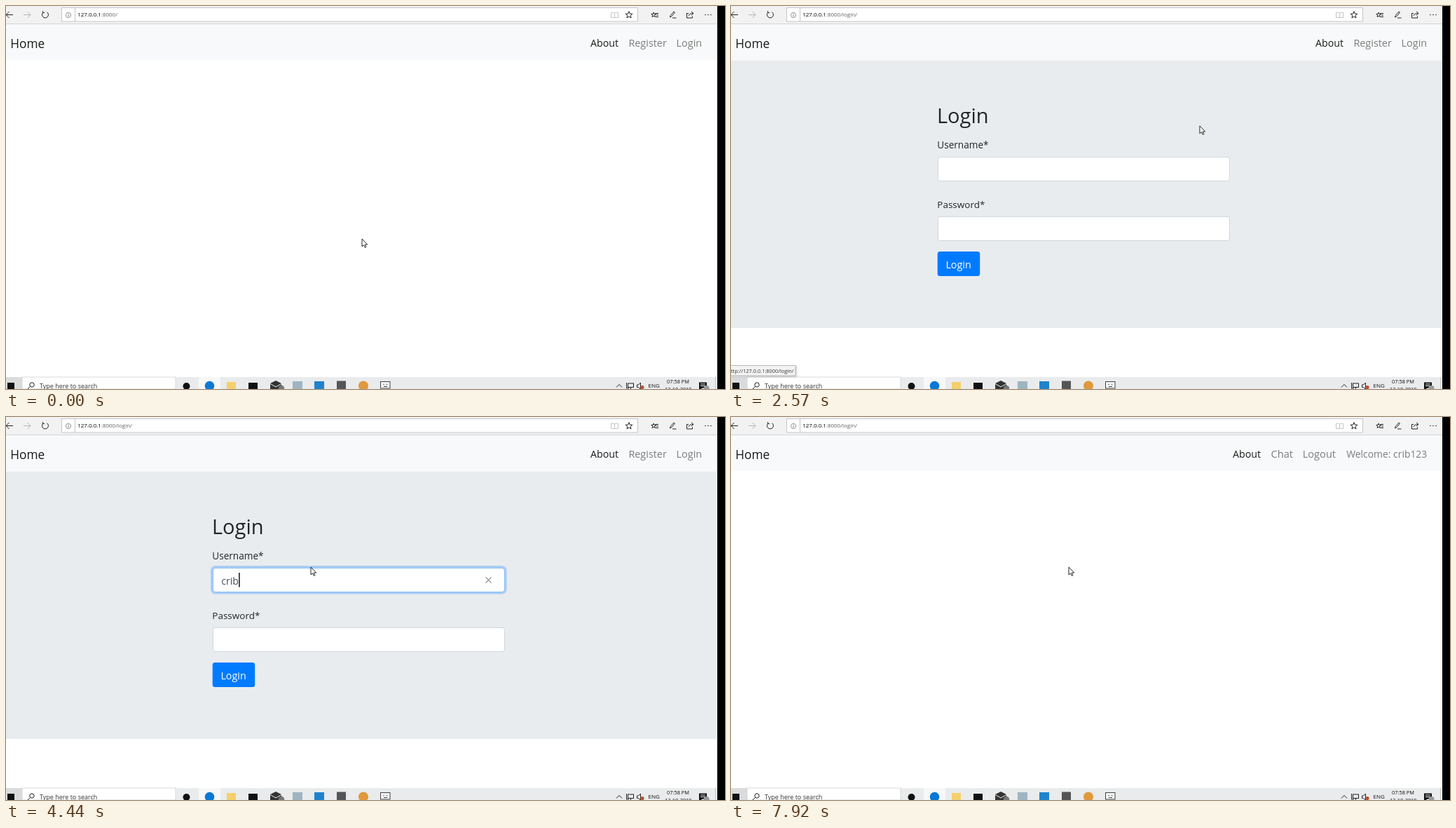
Write an HTML page that moves like this. It is 1026 px wide and 546 px high and loops after 8000 ms.

```html
<!DOCTYPE html>
<html lang="en">
<head>
<meta charset="utf-8">
<title>Login demo</title>
<style>
html, body { margin: 0; width: 100%; height: 100%; overflow: hidden; background: #fff; }
svg { display: block; width: 1026px; height: 546px; }
text { font-family: "Open Sans", "Noto Sans", sans-serif; white-space: pre; }
#dialog > .panel { filter: drop-shadow(0 4px 6px rgba(0, 0, 0, .45)); }
.line { fill: none; stroke-width: 1; }
</style>
</head>
<body>
<svg id="stage" viewBox="0 0 1026 546" xmlns="http://www.w3.org/2000/svg"></svg>
<script>
const LOOP = 8000;
const USER = "crib123";
const USER_KEYS = [3680, 4040, 4240, 4440, 4570, 4760, 4950];
const PASS_KEYS = [6010, 6110, 6310, 6470, 6570, 6760, 6930];
const FOCUS_USER = 3050, FOCUS_PASS = 5700;
const LOGIN_PAGE = 2350, WELCOME_PAGE = 7820;

// time, x, y of the pointer's tip
const POINTER = [
  [0, 508, 332], [300, 508, 332], [630, 532, 321], [800, 532, 321],
  [910, 583, 309], [1210, 583, 309], [1730, 782, 217], [1980, 1004, 60],
  [2020, 1000, 59], [2120, 976, 52], [2250, 976, 52], [2620, 622, 189],
  [2820, 520, 214], [3050, 428, 238], [3300, 428, 238], [3650, 435, 214],
  [7320, 435, 214], [7590, 482, 214], [8000, 482, 214]
];

const text = (x, y, size, str, fill = "#212529", extra = "") =>
  `<text x="${x}" y="${y}" font-size="${size}" fill="${fill}" ${extra}>${str}</text>`;
const rect = (x, y, w, h, fill, extra = "") =>
  `<rect x="${x}" y="${y}" width="${w}" height="${h}" fill="${fill}" ${extra}/>`;
const line = (d, stroke = "#222", extra = "") =>
  `<path class="line" d="${d}" stroke="${stroke}" ${extra}/>`;
const dot = (x, y, r, fill, extra = "") =>
  `<circle cx="${x}" cy="${y}" r="${r}" fill="${fill}" ${extra}/>`;
const group = (id, body) => `<g id="${id}">${body}</g>`;
const cross = (x, y, r, stroke) =>
  line(`M${x - r} ${y - r}l${2 * r} ${2 * r}M${x + r} ${y - r}l${-2 * r} ${2 * r}`, stroke);

function star(cx, cy, r) {
  let d = "";
  for (let i = 0; i < 10; i++) {
    const a = i * Math.PI / 5 - Math.PI / 2, q = i % 2 ? r * 0.42 : r;
    d += (i ? "L" : "M") + (cx + q * Math.cos(a)).toFixed(2) + " " + (cy + q * Math.sin(a)).toFixed(2);
  }
  return line(d + "Z");
}

function field(id, y) {
  return rect(293.5, y - 1.5, 419.5, 37.5, "none",
      `id="${id}Glow" rx="5" stroke="#007bff" stroke-opacity=".27" stroke-width="3"`) +
    rect(295.3, y + .3, 416.2, 34.2, "#fff", `rx="3.5" stroke="#ced4da"`) +
    rect(295.3, y + .3, 416.2, 34.2, "none", `id="${id}Edge" rx="3.5" stroke="#80bdff"`);
}

const toolbar =
  rect(0, 0, 1015, 26, "#f2f2f2") + rect(0, 25, 1015, 1, "#d4d4d4") +
  line("M10 12.5H0M4.5 8L0 12.5L4.5 17") +
  line("M25 12.5H35M30.5 8L35 12.5L30.5 17", "#b5b5b5") +
  group("reload", line("M53 9A4.5 4.5 0 1 0 58.5 8.7M52.5 7.2V9.6H55")) +
  group("stop", cross(56, 12.5, 4, "#222")) +
  rect(79.5, 2.5, 822, 19.5, "#fff", `stroke="#c6c6c6"`) +
  dot(89, 13, 3.6, "none", `stroke="#777" stroke-width=".8"`) +
  line("M89 12.3V15M89 10.7V11.5", "#777", `stroke-width=".8"`) +
  rect(98, 3, 1, 19, "#c6c6c6") +
  `<text x="102.3" y="15.4" font-size="7.95" fill="#000">127.0.0.1<tspan id="path" fill="#606060">:8000/</tspan></text>` +
  line("M868.5 10V17M868.5 10Q866 8.5 863.5 9.5V16.5H873.5V9.5Q871 8.5 868.5 10", "#c4c4c4") +
  star(889, 12.8, 5.2) +
  star(924.2, 12.6, 3.6) + line("M926.5 10.5H931M928 13H931M927 15.5H931") +
  line("M947.5 16L948.3 13.5L953 8L954.5 9.2L949.8 14.8ZM951 17H956.5", "#222", `stroke-width=".9"`) +
  group("share", line("M974 10.5H971.5V17H979.5V14.5M974 14Q975 10.5 981 10.5M978 7.8L981 10.5L978 13.2",
    "#222", `stroke-width=".9"`)) +
  [998, 1002, 1006].map(x => dot(x, 12.5, .8, "#222")).join("");

const grey = "#7c7d7d", ink = "#191a1a";
const nav =
  rect(0, 26, 1015, 51, "#f8f9fa") +
  text(6.3, 60, 17.3, "Home", ink) +
  group("guestNav",
    text(834, 58, 14.2, "About", ink) +
    text(888.4, 58, 14.4, "Register", grey) +
    text(956.6, 58, 14.4, "Login", grey, `id="loginLink"`)) +
  group("userNav",
    text(716, 58, 14.2, "About", ink) +
    text(770.6, 58, 14.6, "Chat", grey) +
    text(815.7, 58, 14.6, "Logout", grey) +
    text(878.2, 58, 13.9, "Welcome: " + USER, grey));

const dotsX = i => 312.2 + i * 8.9;
const form = group("form",
  rect(-10, 77.5, 1025, 381.5, "#e9ecef", `rx="4"`) +
  text(294, 167, 29, "Login") +
  text(294.3, 203, 13.6, "Username*") +
  field("user", 215) +
  text(307.2, 238.5, 14.2, "", "#495057", `id="userText"`) +
  group("clear", cross(688.5, 232.5, 4, "#555")) +
  text(294.3, 288, 13.5, "Password*") +
  field("pass", 300) +
  PASS_KEYS.map((_, i) => dot(dotsX(i), 319.6, 3.2, "#495057", `class="mask"`)).join("") +
  group("eye", line("M683.5 318.2Q688.5 311.8 693.5 318.2", "#666", `stroke-width=".8"`) +
    dot(688.5, 318.3, 1.9, "none", `stroke="#666" stroke-width=".8"`)) +
  rect(0, 0, 1.4, 20.5, "#000", `id="caret"`) +
  rect(294.7, 349.9, 60.5, 35.2, "#007bff", `rx="3.5"`) +
  text(306.4, 374, 14.3, "Login", "#fff"));

const center = `text-anchor="middle"`;
const dialog = group("dialog",
  rect(359.5, 170.5, 288, 167, "#f2f2f2", `class="panel" stroke="#a0a0a0"`) +
  cross(634.5, 183.5, 3, "#333") +
  text(374.6, 210, 12.15, "Turn on caret browsing?", "#111") +
  ["This adds a cursor on webpages so you can select text with your",
   "keyboard. F7 turns caret browsing on or off for all tabs and",
   "windows."].map((s, i) => text(374.6, 229.7 + 12 * i, 8.5, s, "#111")).join("") +
  rect(375.7, 273, 11.3, 11.6, "none", `stroke="#222" stroke-width="1.4"`) +
  text(391.4, 281.4, 8.5, "Don't ask me again when I press F7", "#111") +
  rect(375, 302, 127, 20.5, "#c3c3c2") +
  rect(505, 302, 127, 20.5, "#c3c3c2") +
  rect(505.8, 302.8, 125.4, 18.9, "none", `id="hover" stroke="#777" stroke-width="1.6"`) +
  text(438.5, 315.2, 8.5, "Turn on", "#111", center) +
  text(568.5, 315.2, 8.5, "Cancel", "#111", center));

const taskbar =
  rect(0, 529, 1015, 17, "#e9ebec") +
  rect(0, 529, 23, 17, "#d9dbdc") +
  rect(2, 537, 10, 9, "#111") +
  rect(23, 529, 219, 17, "#fff", `stroke="#cfcfcf" stroke-width=".8"`) +
  dot(37, 540, 3.2, "none", `stroke="#222"`) + line("M34.6 542.4L31 546") +
  text(48, 545.2, 9, "Type here to search", "#333") +
  dot(257.5, 542, 5, "#111") +
  rect(275, 529, 31, 17, "#f6f7f7") +
  dot(290.5, 541.5, 6.8, "#0a78d4") +
  rect(315, 536, 13, 10, "#f4cf6c") +
  rect(346, 537, 13, 9, "#111") +
  `<path d="M377 538L385 534L393 538V546H377Z" fill="#333"/>` +
  line("M377 538.5L385 543L393 538.5", "#eee") + dot(393, 545, 4.2, "#777") +
  rect(409, 535, 14, 11, "#9fb4c1") +
  rect(440, 535, 14, 11, "#1f83cc") +
  rect(472, 534.5, 13, 12, "#555") +
  dot(510, 541.5, 7, "#e0993c") +
  rect(534.5, 535.5, 13.5, 9.5, "#f4f4f4", `stroke="#444"`) +
  dot(539, 539.5, .7, "#444") + dot(543.5, 539.5, .7, "#444") + line("M539 542.5H544", "#444") +
  line("M871 543.5L875 539.5L879 543.5") +
  rect(887.5, 538, 8, 5.5, "none", `stroke="#222"`) + line("M885.5 537V545H889M891.5 544V546") +
  line("M900.5 540H902.5L905.5 537V546L902.5 543.5H900.5Z") +
  dot(908, 543.5, 2.6, "#b8502f") +
  text(916.5, 544, 8, "ENG", "#111") +
  text(943, 538, 7.4, "07:58 PM", "#111") +
  text(940, 549.2, 7.4, "13-10-2019", "#111") +
  `<path d="M989 536.5H1000V544.5H994L991.5 546H989Z" fill="#111"/>` +
  line("M991 539H998M991 541.5H998", "#eee", `stroke-width=".8"`) + dot(999.5, 545, 4, "#999") +
  rect(1012, 529, 1, 17, "#c8c8c8");

const status = group("status",
  rect(-3, 512.5, 95, 14.5, "#f3f3f3",
    `stroke="#bcbcbc" style="filter:drop-shadow(1px 1px 1px rgba(0,0,0,.25))"`) +
  text(0, 522.6, 7.4, "ttp://127.0.0.1:8000/login/", "#333"));

const pointer = `<path id="pointer" d="M0 0V11L2.6 8.7L4.3 12.4L5.9 11.7L4.3 8.1H7.7Z"
  fill="#fff" stroke="#111" stroke-width=".9"/>`;

const stage = document.getElementById("stage");
stage.innerHTML = rect(0, 0, 1026, 546, "#fff") + form + nav + toolbar +
  rect(0, 0, 1015, 529, "#fff", `id="veil"`) + dialog + taskbar + status + pointer +
  rect(1015, 0, 11, 546, "#000");

const el = {};
stage.querySelectorAll("[id]").forEach(n => el[n.id] = n);
const masks = [...stage.querySelectorAll(".mask")];

const clamp = v => Math.max(0, Math.min(1, v));
const ramp = (t, start, length) => {
  const p = clamp((t - start) / length);
  return p * p * (3 - 2 * p);
};
const show = (node, on) => node.style.display = on ? "" : "none";
const fade = (node, alpha) => node.style.opacity = alpha;
const countPast = (times, t) => times.filter(k => k <= t).length;

function pointerAt(t) {
  const i = Math.max(1, POINTER.findIndex(k => k[0] > t));
  const [t0, x0, y0] = POINTER[i - 1], [t1, x1, y1] = POINTER[i];
  const p = (t - t0) / (t1 - t0);
  return [x0 + (x1 - x0) * p, y0 + (y1 - y0) * p];
}

function drawCaret(t, typed, masked) {
  const onPass = t >= FOCUS_PASS;
  const last = Math.max(...[FOCUS_USER, FOCUS_PASS, ...USER_KEYS, ...PASS_KEYS].filter(k => k <= t));
  const width = typed ? el.userText.getComputedTextLength() : 0;
  el.caret.setAttribute("x", onPass ? 308 + masked * 8.9 : 307.4 + width);
  el.caret.setAttribute("y", onPass ? 307 : 222);
  fade(el.caret, t < FOCUS_USER ? 0 : 1 - clamp((t - last - 365) / 160));
}

function draw(t) {
  const onForm = t >= LOGIN_PAGE && t < WELCOME_PAGE;
  const loading = (t >= 2200 && t < LOGIN_PAGE) || (t >= 7030 && t < WELCOME_PAGE);
  const typed = countPast(USER_KEYS, t), masked = countPast(PASS_KEYS, t);
  const onLink = t >= 2040 && t < 2300;

  const open = ramp(t, 60, 240) * (1 - ramp(t, 1210, 240));
  fade(el.dialog, open);
  fade(el.veil, open * .6);
  show(el.hover, t >= 820);

  show(el.form, onForm);
  show(el.guestNav, t < WELCOME_PAGE);
  show(el.userNav, t >= WELCOME_PAGE);
  show(el.status, t >= 2040 && t < 2740);
  el.loginLink.setAttribute("fill", onLink ? "#4a4b4b" : grey);
  el.path.textContent = t < LOGIN_PAGE ? ":8000/" : ":8000/login/";
  show(el.reload, !loading);
  show(el.stop, loading);
  fade(el.share, loading ? .35 : 1);

  const passFocus = ramp(t, FOCUS_PASS, 150);
  const userFocus = ramp(t, FOCUS_USER, 150) * (1 - passFocus);
  [el.userGlow, el.userEdge].forEach(n => fade(n, userFocus));
  [el.passGlow, el.passEdge].forEach(n => fade(n, passFocus));

  if (onForm) {
    el.userText.textContent = USER.slice(0, typed);
    masks.forEach((m, i) => show(m, i < masked));
    show(el.clear, typed > 0 && t < FOCUS_PASS);
    show(el.eye, masked > 0);
    drawCaret(t, typed, masked);
  }

  const [x, y] = pointerAt(t);
  el.pointer.setAttribute("transform", `translate(${x.toFixed(1)} ${y.toFixed(1)})`);
}

const start = performance.now();
function tick() {
  draw((performance.now() - start) % LOOP);
  requestAnimationFrame(tick);
}
tick();
</script>
</body>
</html>
```
